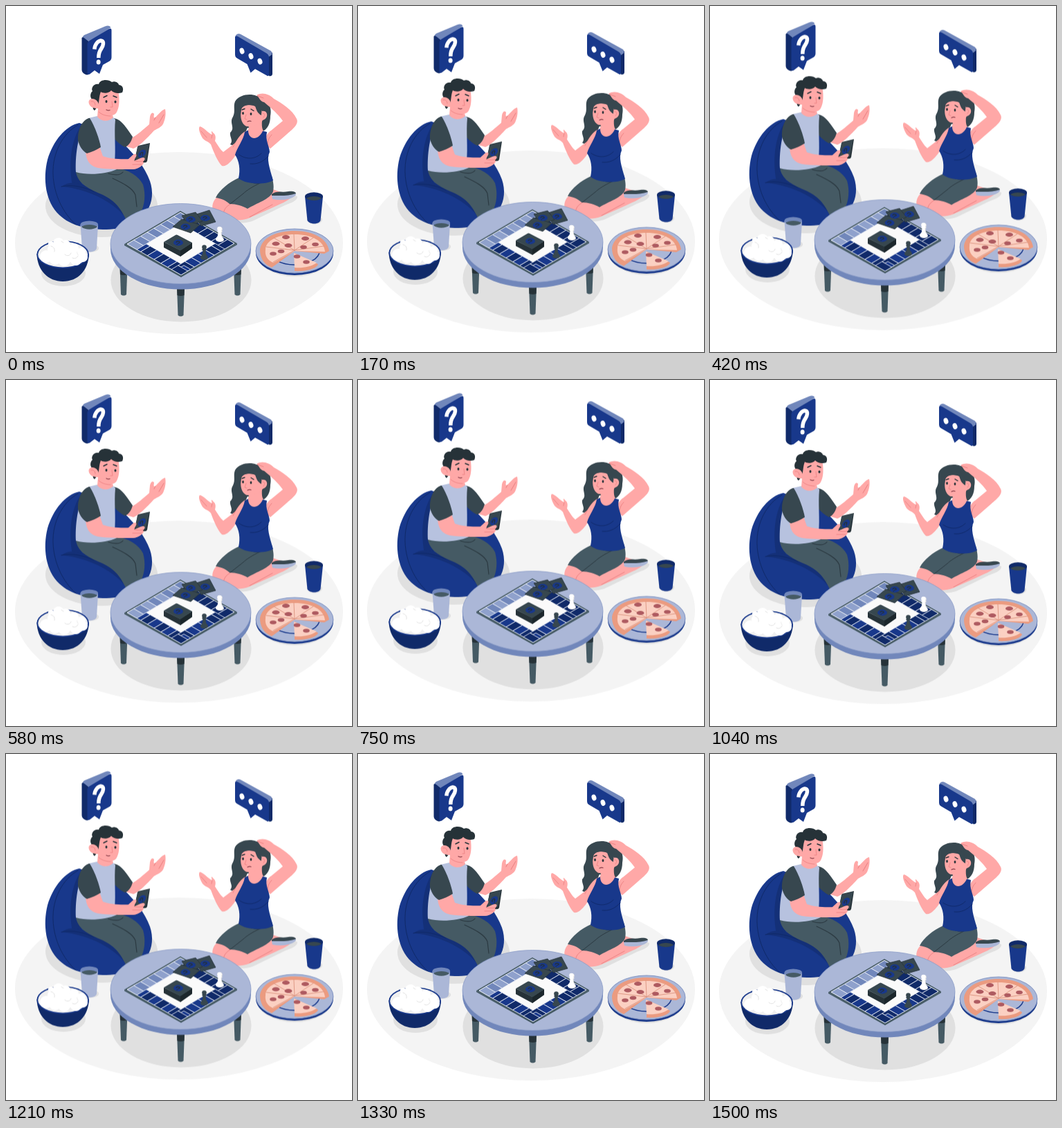
An HTML page that plays this animation: 500x500 px, repeating every 1.54 s.

```html
<!DOCTYPE html>
<html lang="en">
<head>
<meta charset="utf-8">
<title>Board game night</title>
<style>
  html, body { margin: 0; width: 100%; height: 100%; overflow: hidden; background: #fff; }
  svg { display: block; width: 100%; height: 100%; }
  #scene { animation: float 1540ms linear infinite; }
  @keyframes float {
    0%, 100% { transform: translateY(0); }
    47.4% { transform: translateY(-9.7px); }
    98.7% { transform: translateY(.3px); }
  }
  .navy { fill: #18388b; }
  .deep { fill: #102a69; }
  .dusk { fill: #143078; }
  .mid { fill: #7187bb; }
  .pale { fill: #abb7d7; }
  .ink { fill: #263238; }
  .dark { fill: #37474f; }
  .slate { fill: #455a64; }
  .skin { fill: #ffa8a7; }
  .white { fill: #fff; }
  .floor { fill: #f4f4f4; }
  .shade { fill: #e0e0e0; }
  .line { fill: none; stroke-linecap: round; stroke-linejoin: round; }
  .fold { stroke: #102a69; }
  .crease { stroke: #2c3a42; }
  .blush { stroke: #ea7f80; }
  .crust { fill: #eb9b80; }
  .cheese { fill: #fbd0c2; }
  .salami { fill: #ae5a60; }
</style>
</head>
<body>
<svg viewBox="0 0 500 500">
<defs>
  <g id="badge">
    <ellipse class="navy" rx="7" ry="4.4"/>
    <path class="line" stroke="#263238" stroke-width="1.3" d="M-3 -.6C-2 -3 3 -2 2 0L-.4 1M-2 2.4h.4"/>
  </g>
  <g id="leg">
    <path class="slate" d="M-5.5 0H5.5L4 41Q0 44-4 41Z"/>
    <path class="ink" d="M-5.5 0H5.5L5 12Q0 14-5 12Z"/>
  </g>
  <g id="pawn">
    <path d="M-5.5 18C-5.5 15-3 14.5-2.5 12L-1.8 5H1.8L2.5 12C3 14.5 5.5 15 5.5 18C5 22-5 22-5.5 18Z"/>
    <ellipse cy="6" rx="3.3" ry="1.3"/>
    <circle cy="2.5" r="3.3"/>
  </g>
</defs>
<g id="scene">
  <ellipse class="floor" cx="250" cy="342.5" rx="237" ry="131.5"/>
  <g class="shade">
    <ellipse cx="138" cy="289" rx="81" ry="45"/>
    <ellipse cx="253" cy="396" rx="101.5" ry="60.5"/>
    <ellipse cx="83" cy="386" rx="32" ry="19"/>
    <ellipse cx="417" cy="358" rx="55" ry="33"/>
    <ellipse cx="446" cy="309" rx="11" ry="6.5"/>
    <ellipse cx="121" cy="350" rx="13" ry="6"/>
    <path d="M318 306L395 268L421 275C422 281 411 285 403 288L360 309C348 315 330 316 318 306Z"/>
  </g>

  <g id="question">
    <path class="mid" d="M110 47Q110 44 113 42L143 29.5Q149 27 151.500 31L118 53Z"/>
    <path class="deep" d="M109.500 46Q111 44 114 47L119 51V99Q117 100 114 98.500Q109.500 96 109.500 92Z"/>
    <path class="navy" d="M117.500 55Q117.500 52 120 50.500L148 33.500Q152.500 31 152.500 35V74Q152.500 78 149 80L140 85L135 98L128 93L121 98.500Q117.500 100 117.500 96Z"/>
    <path class="line" stroke="#fff" stroke-width="5.500" style="stroke-linecap:butt" d="M127.800 62.500C128.500 55 133 50.500 137 50C142.500 50.500 140.500 58 137.500 62C134.500 66 133.800 69 133.800 75"/>
    <ellipse class="white" cx="133.600" cy="81" rx="3" ry="3.600"/>
  </g>

  <g id="dots">
    <path class="deep" d="M378 74L385 67V98Q385 101 381 101.500L377 98Z"/>
    <path class="mid" d="M331.500 43Q334 39 338.500 40.500L383 65Q385 67 384.500 70L379 74Z"/>
    <path class="navy" d="M331 45Q331 42 335 44L376 68Q380 70.500 380 74V98Q380 103 376 100L360 91L353.500 96.500L348.500 84L334 75.500Q331 74 331 70Z"/>
    <g class="white">
      <ellipse cx="341" cy="65" rx="3.300" ry="4.500" transform="rotate(-20 341 65)"/>
      <ellipse cx="354" cy="72.500" rx="3.300" ry="4.500" transform="rotate(-20 354 72.500)"/>
      <ellipse cx="367" cy="80" rx="3.300" ry="4.500" transform="rotate(-20 367 80)"/>
    </g>
  </g>

  <g id="beanbag">
    <path class="navy" d="M106 169C86 173 68 195 60 222C53 250 57 283 77 302C94 318 119 323 145 323C175 322 195 312 204 296C212 283 213 268 208 253C201 233 184 211 160 190Z"/>
    <path class="dusk" d="M108 174C94 194 90 228 96 259L112 262L102 240L106 200Z"/>
    <path class="dusk" d="M80 261C90 254 102 254 116 260L160 279L174 308C161 287 121 264 80 261Z"/>
    <path class="line fold" d="M104 172C82 184 67 212 68 243C69 272 82 299 101 316M80 261C96 257 113 262 127 268"/>
  </g>

  <g id="man">
    <path class="slate" d="M101 240C104 254 113 261 133 270C153 278 164 288 173 308L194 300C201 287 202 272 198 258C191 245 178 237 157 233Z"/>
    <path class="line crease" stroke-width="1.200" d="M154 249C169 256 183 263 187 273L189 290M148 242C158 245 165 245 169 240"/>

    <path class="skin" d="M159 190L174 203L184 206C191 204 204 191 214 180C219 177 226 175 228 168C231 161 231 153 230 149C226 149 219 158 216 161C214 162 213 162 214 156C212 153 209 155 208 160L207 171C199 178 189 187 181 191L167 174Z"/>
    <path class="line blush" d="M216 161L214 165M228 157L221 169"/>
    <path class="dark" d="M154 162C164 162 171 171 183 189C181 196 178 201 172 204C166 201 160 196 156 191Z"/>
    <path fill="#b7c2df" d="M119 162L132 159C140 168 150 166 154 160L158 164C156 184 159 207 157 225L160 236C145 243 118 245 101 240C100 222 102 184 119 162Z"/>
    <path class="skin" d="M133 148L153 154L155 161C149 168 137 167 132 160Z"/>
    <path class="skin" d="M115 207C115 220 119 231 133 234C148 236 166 236 181 236C190 236 198 231 200 225C201 221 199 218 194 218L181 221C166 222 151 221 140 217L134 200Z"/>
    <path class="dark" d="M120 162C109 165 103 181 104 194C106 203 111 210 117 213C124 211 131 208 137 204C135 193 129 175 121 162Z"/>
    <path class="ink" d="M191 202L208 198L204 224Q203 227 199 226L185 225Z"/>
    <path class="dark" d="M190 203L207 199L202 223L186 224Z"/>
    <use href="#badge" transform="translate(196.500 213.500) rotate(-50)"/>
    <path class="skin" d="M176 222C181 218 184 213 188 214C190 217 185 221 185 224L194 220C202 217 202 222 198 225C200 230 190 237 180 236Z"/>
    <path class="line blush" d="M186 224C190 225 195 225 198 224M183 229L196 229" stroke-width=".8"/>

    <path class="skin" d="M130 123C143 115 161 118 163 127C164 137 164 147 159 155C153 161 139 158 134 150Z"/>
    <path class="ink" d="M128 151C124 149 126 142 126 136C121 134 121 126 125 123C122 118 128 111 134 113C135 106 148 105 153 110C157 108 163 111 163 114C170 115 170 121 168 125C162 127 156 126 152 122C148 127 140 126 137 124C134 131 135 140 132 146Z"/>
    <path class="skin" d="M134 142C132 133 120 131 119.500 139C120 146 127 148 132 148L140 151Z"/>
    <path class="line blush" stroke-width=".8" d="M123 138C127 137 129 140 129 143M153 138L154 146L151 146M134 153C139 158 147 159 151 159"/>
    <path class="line" stroke="#263238" stroke-width="1.500" d="M141 132L146 129.500M155 130L160 132"/>
    <ellipse class="ink" cx="145" cy="138" rx="1.500" ry="2"/>
    <ellipse class="ink" cx="158" cy="138.500" rx="1.500" ry="2"/>
    <path class="line" stroke="#873c48" stroke-width="1.200" d="M145 150C147 151 148 151.500 150 150.500"/>
  </g>

  <g id="woman">
    <path class="skin" d="M306 275C297 283 295 295 305 301C318 309 337 312 350 307L386 291C396 286 406 283 414 275L386 265Z"/>
    <path class="pale" d="M384 274C393 268 398 272 408 269C415 268 419 270 419 273C414 279 400 282 385 279Z"/>
    <path class="dark" d="M384 272C391 266 397 270 408 268C415 267 419 269 419 271C408 275 396 274 384 274Z"/>
    <path class="slate" d="M337 248C322 255 309 265 303 277C311 278 318 281 323 286C333 286 342 289 349 293C362 285 382 279 386 268C388 259 385 250 384 246Z"/>
    <path class="line crease" d="M367 256C356 261 347 267 343 271L324 286M350 253C356 256 362 257 367 256"/>
    <path class="line blush" stroke-width=".9" d="M323 287C316 291 313 298 315 304M352 305L385 287"/>

    <path class="dark" d="M331 138C337 128 353 126 362 130C378 131 385 146 382 159C382 170 378 178 371 181L349 176C345 183 348 187 341 191C338 198 331 204 324 200C329 194 323 190 324 183C332 176 322 169 328 160C332 152 328 145 331 138Z"/>
    <path class="skin" d="M349 180C341 182 336 190 331 198L314 211C309 207 305 199 302 195C304 188 302 185 299 183C296 178 297 184 298 186C291 183 286 175 280 174C277 177 281 186 284 191C288 196 292 195 296 200C300 211 306 225 312 231C318 233 325 225 331 217L345 199Z"/>
    <path class="line blush" stroke-width=".8" d="M298 186L297 191M282 181L290 190M331 198L328 204"/>
    <path class="skin" d="M362 129C370 124 380 127 387 134C398 140 414 150 420 163C424 171 413 179 405 186L382 206L370 196C378 186 379 182 383 180L400 166C394 157 384 148 373 139C367 138 367 133 362 129Z"/>
    <path class="line blush" stroke-width=".9" d="M364 130L372 133M378 204C377 196 380 190 384 186"/>
    <path class="skin" d="M350 166L370 165C369 177 371 182 377 183L374 204L343 200L344 183C351 181 352 176 350 166Z"/>
    <path class="navy" d="M345 182L350 179.500C350 194 365 195 371 180.500L377 182C374 194 381 203 381 211C376 221 381 234 386 252C375 259 347 258 336 249C339 236 337 224 331 215C334 204 343 194 345 182Z"/>
    <path class="line fold" d="M337 215C347 222 360 222 369 213M379 217C371 226 362 229 353 228" stroke-width=".9"/>
    <path class="skin" d="M341 146C350 140 366 143 370 152C379 150 380 163 371 165C368 171 357 175 348 174C338 170 338 155 341 146Z"/>
    <path class="dark" d="M336 152C337 136 352 134 363 140C372 147 369 153 369 158C362 154 362 149 360 145C352 142 344 142 340 149L338 164Z"/>
    <path class="line blush" stroke-width=".8" d="M371 155C374 155 375 157 372 161M347 157L345 163L348 164"/>
    <path class="line" stroke="#263238" stroke-width="1.400" d="M341 150L345 148.500M354 149L358 151.500"/>
    <ellipse class="ink" cx="342.500" cy="155" rx="1.400" ry="2"/>
    <ellipse class="ink" cx="354" cy="156" rx="1.400" ry="2"/>
    <path class="line" stroke="#873c48" stroke-width="1.200" d="M349 167C351 166 353 166 354 166.500"/>
  </g>

  <g id="glass">
    <path class="pale" d="M107.500 316H133L131 350C130 357 112 357 110 350Z"/>
    <ellipse class="mid" cx="120.300" cy="316" rx="12.800" ry="5.500"/>
    <path class="slate" d="M109 319C114 315 127 315 132 319C127 324 114 324 109 319Z"/>
  </g>

  <g id="popcorn">
    <path class="deep" d="M44.500 358C45 382 61 398 82 398C104 398 119 382 120 358Z"/>
    <ellipse class="navy" cx="82.200" cy="359" rx="37.800" ry="20"/>
    <ellipse cx="82.200" cy="359" rx="36" ry="18.500" fill="#f0f0f0"/>
    <g class="white" id="kernels"></g>
    <path class="line" stroke="#e0e0e0" stroke-width=".9" d="M65 347C69 348 71 351 70 355M85 359C88 362 93 361 94 357M96 364C99 366 103 364 104 361M80 340L83 342"/>
  </g>

  <g id="table">
    <use href="#leg" x="170" y="376"/>
    <use href="#leg" x="334.500" y="376"/>
    <use href="#leg" x="252.500" y="406"/>
    <path class="mid" d="M151 343V351A101.500 58.500 0 0 0 354 351V343Z"/>
    <ellipse class="pale" cx="252.500" cy="343.500" rx="101.500" ry="58" stroke="#8497c5" stroke-width=".7"/>
    <path class="slate" d="M171 344L253 390L334 343V345L253 392L171 346Z"/>
    <g id="board" transform="matrix(.82 .47 -.81 .48 252 296)"></g>
    <path class="ink" d="M228 341L252 353L269 342V350L252 362L228 349Z"/>
    <path fill="#1c272c" d="M252 353L269 342V350L252 362Z"/>
    <path class="dark" d="M228 341L245 331Q246 330 248 331L269 342L252 353.500Z"/>
    <use href="#badge" x="249" y="342"/>
    <g class="dark" stroke="#263238" stroke-width=".7">
      <path d="M272 302L294 295L303 312L282 318Z"/>
      <path d="M254 303L274 298L284 311L264 318Z"/>
      <path d="M241 319L254 308L280 316L267 328Z"/>
    </g>
    <use href="#badge" x="288" y="306.500"/>
    <use href="#badge" x="267" y="308.500"/>
    <use href="#badge" x="259.500" y="319"/>
    <use href="#pawn" class="shade" x="309.500" y="320"/>
    <use href="#pawn" class="white" x="308.500" y="319.500"/>
    <use href="#pawn" class="dark" x="286.500" y="346"/>
  </g>

  <g id="pizza">
    <path class="navy" d="M361 353V357A56 32 0 0 0 473 357V353Z"/>
    <ellipse class="pale" cx="417" cy="354" rx="56" ry="32" stroke="#7187bb" stroke-width=".8"/>
    <ellipse class="line" cx="417" cy="354" rx="36" ry="20" stroke="#18388b" stroke-width="1.500"/>
    <path class="crust" d="M417 354L384 378C371 373 367 362 367 352C370 334 391 325 417 325C447 325 465 338 467 354L460 358Z"/>
    <path class="cheese" d="M417 354L386 371C377 367 374 360 375 352C375 339 393 330 417 330C442 330 460 340 461 355Z"/>
    <path class="line" stroke="#dc947f" stroke-width=".9" d="M417 353L376 348M417 353L387 335M417 353L416 330M417 353L444 335M417 353L459 347M417 353L386 370"/>
    <path class="crust" d="M417 357L451 373C449 380 432 384 417 383Z"/>
    <path class="cheese" d="M416 357L449 371C441 377 428 379 417 378Z"/>
    <g class="salami" id="toppings"></g>
  </g>

  <g id="cup">
    <path class="navy" d="M432 275L435.500 310C439 316 452 316 454.500 310L458 275Z"/>
    <ellipse class="deep" cx="445" cy="275" rx="13" ry="5.800"/>
    <path class="dark" d="M434 278C439 274 451 274 456 278C451 282 439 282 434 278Z"/>
  </g>
</g>
</svg>
<script>
  const add = (id, tag, attrs) => {
    const el = document.createElementNS('http://www.w3.org/2000/svg', tag);
    for (const key in attrs) el.setAttribute(key, attrs[key]);
    document.getElementById(id).append(el);
  };
  const square = (x, y, width, height, fill, stroke = 'none') =>
    add('board', 'rect', { x, y, width, height, fill, stroke, 'stroke-width': .8 });

  // Board: frame, then a ring of cells around the white centre
  square(0, 0, 100, 100, '#455a64');
  square(2.5, 2.5, 95, 95, '#fafafa');
  const count = 8, band = 17, step = 95 / count, far = 97.5 - band;
  for (let i = 0; i < count; i++) {
    const at = 2.5 + step * i;
    square(at, 2.5, step, band, '#102a69', '#eef1f8');
    square(2.5, at, band, step, i % 2 ? '#8fa1cc' : '#7187bb', '#eef1f8');
    square(at, far, step, band, i % 2 ? '#18388b' : '#102a69', '#eef1f8');
    square(far, at, band, step, i > 2 && i < 6 ? '#18388b' : '#102a69', '#eef1f8');
  }

  const kernels = [[76, 343, 8], [86, 345, 7], [68, 352, 8], [98, 350, 7], [82, 353, 10],
    [58, 362, 9], [71, 365, 9], [93, 360, 10], [109, 355, 6], [111, 363, 7],
    [84, 367, 9], [101, 367, 8], [65, 344, 4]];
  for (const [cx, cy, r] of kernels) add('kernels', 'circle', { cx, cy, r });

  const toppings = [[390, 343.5], [404.5, 334], [432.5, 336], [408, 346], [386, 358],
    [397.5, 354.5], [430, 348.5], [447, 344.5], [420.5, 362], [434, 370]];
  toppings.forEach(([cx, cy], i) =>
    add('toppings', 'ellipse', { cx, cy, rx: i < 4 ? 5.5 : 4.8, ry: i < 4 ? 3 : 2.7 }));
</script>
</body>
</html>
```
